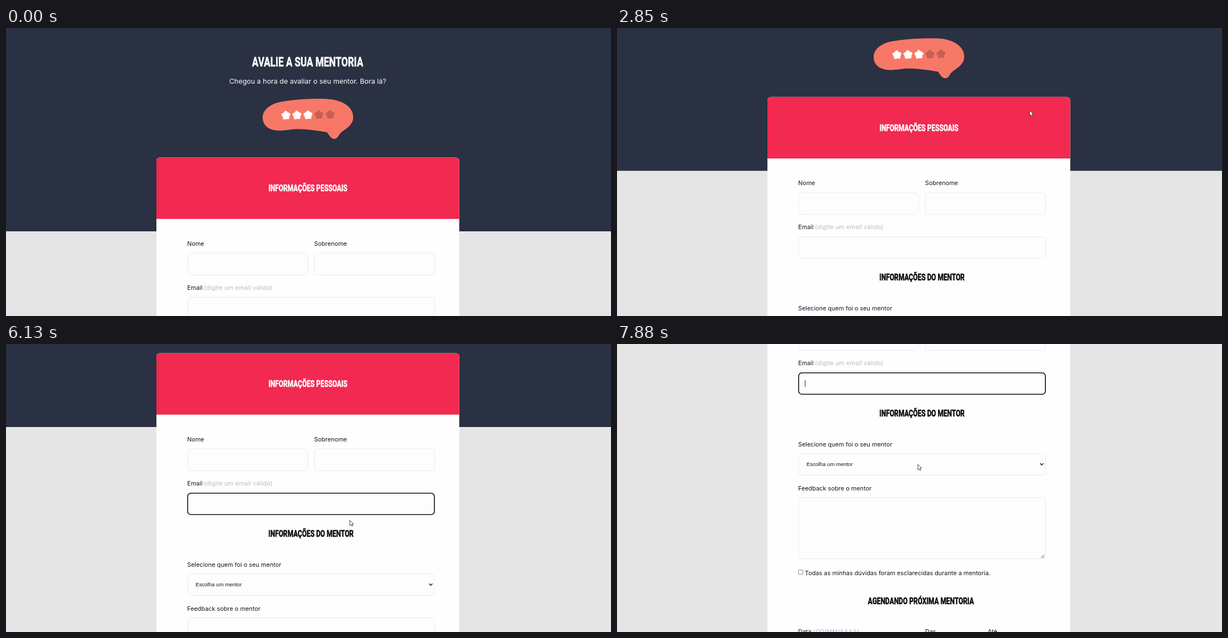
An HTML page for the animation above (8 s loop, 1082 by 517 pixels).

```html
<!DOCTYPE html>
<html lang="pt-BR">
<head>
<meta charset="utf-8">
<title>Avalie a sua mentoria</title>
<style>
  html, body { margin: 0; width: 100%; height: 100%; overflow: hidden; background: #e5e5e5; }
  svg { display: block; }
  text { font: 10.75px Inter, sans-serif; letter-spacing: .04px; fill: #17131f; }
  .head { font: bold 17.2px Roboto, sans-serif; letter-spacing: 0; fill: #0c0c10; stroke: #0c0c10; stroke-width: .6; text-anchor: middle; }
  .light { fill: #fff; stroke: #fff; }
  .title { font-size: 24.6px; }
  .lead { font-size: 12.35px; fill: #fff; text-anchor: middle; }
  .hint { fill: #bab7ca; letter-spacing: .22px; }
  .choice { font: 9.6px "Liberation Sans", Arial, sans-serif; letter-spacing: 0; }
  .field { fill: #fdfdfd; stroke: #ebebee; }
  #ring { fill: none; stroke: #121216; stroke-width: 1.6; }
  .thin { fill: none; stroke: #222; }
</style>
</head>
<body>
<svg width="1082" height="517" viewBox="0 0 1082 517">
  <g id="page">
    <rect width="1082" height="365" fill="#293142"/>
    <text class="lead" x="539.7" y="100.3">Chegou a hora de avaliar o seu mentor. Bora lá?</text>
    <path fill="#f87868" d="M459 161C459 147 472 137 490 133C515 128 550 126 575 127.5C602 129 621 142 621 160C621 174 609 180 600 187C594 192 594 199 587 199C581 199 578 192 574 187C560 185 545 182 525 181.5C508 181 498 185 485 184C469 183 459 174 459 161Z"/>
    <g id="stars" stroke-width="5" stroke-linejoin="round"></g>

    <rect x="269" y="232.4" width="541.6" height="900" rx="6" fill="#fefefe"/>
    <path fill="#f22950" d="M269 342.8V238.4a6 6 0 0 1 6-6H804.6a6 6 0 0 1 6 6V342.8Z"/>
    <g id="heads"></g>

    <text x="324" y="391">Nome</text>
    <text x="551" y="391">Sobrenome</text>
    <text x="324" y="470">Email</text>
    <text class="hint" x="354" y="470">(digite um email válido)</text>
    <text x="324" y="615.5">Selecione quem foi o seu mentor</text>
    <text x="324" y="694.5">Feedback sobre o mentor</text>
    <text x="336" y="847">Todas as minhas dúvidas foram esclarecidas durante a mentoria.</text>
    <text x="324" y="952">Data</text>
    <text class="hint" x="351" y="952">(DD/MM/AAAA)</text>
    <text x="551" y="952">Das</text>
    <text x="663" y="952">Até</text>

    <g class="field">
      <rect x="324.5" y="404" width="215" height="39.5" rx="6"/>
      <rect x="551.5" y="404" width="215" height="39.5" rx="6"/>
      <rect x="324.5" y="483.5" width="442" height="39" rx="6"/>
      <rect x="324.5" y="628.5" width="442" height="39" rx="6"/>
      <rect x="324.5" y="707.5" width="442" height="110" rx="6"/>
    </g>
    <text class="choice" x="339" y="651">Escolha um mentor</text>
    <path class="thin" stroke-width="1.6" d="M756.8 646.3l2.9 2.9 2.9-2.9"/>
    <path class="thin" stroke-width=".9" d="M758.5 816l5.5-5.5M762 816l2-2"/>
    <rect x="324.7" y="837.7" width="8" height="8" rx="1.5" fill="#fff" stroke="#777" stroke-width=".9"/>

    <rect id="ring" rx="6"/>
    <rect id="caret" width="1" height="11.5" fill="#222"/>
  </g>
  <path id="cursor" d="M0 0V9.6L2.2 7.6L3.7 11L5.4 10.2L4 6.9H6.9Z" fill="#fff" stroke="#222" stroke-width=".8"/>
</svg>
<script>
const LOOP = 8000, NOTCH = 72, NOTCH_TIME = 170, BLINK = 530;
const $ = id => document.getElementById(id);
const smooth = p => { p = Math.min(1, Math.max(0, p)); return p * p * (3 - 2 * p); };

// The display face is a bold sans set in one condensed proportion.
const heading = (text, x, y, style = "") =>
  `<text class="head ${style}" transform="translate(${x} ${y}) scale(.69 1)">${text}</text>`;
$("heads").innerHTML =
  heading("AVALIE A SUA MENTORIA", 539.5, 69, "light title") +
  heading("INFORMAÇÕES PESSOAIS", 540, 293.4, "light") +
  heading("INFORMAÇÕES DO MENTOR", 545.5, 561.5) +
  heading("AGENDANDO PRÓXIMA MENTORIA", 543.5, 898.8);

const star = Array.from({ length: 10 }, (_, i) => {
  const r = i % 2 ? 3.8 : 5.7, a = i * Math.PI / 5;
  return `${r * Math.sin(a)},${-r * Math.cos(a)}`;
}).join(" ");
$("stars").innerHTML = [0, 1, 2, 3, 4].map(i => {
  const color = i < 3 ? "#fff" : "#c75f56";
  return `<polygon points="${star}" fill="${color}" stroke="${color}" transform="translate(${500.7 + i * 19.7} ${157 - i * .35}) rotate(-4)"/>`;
}).join("");

const notches = [1989, 2765, 2973, 6353, 6545, 7160];

// Pointer stops: time, x, y
const stops = [
  [380, 1037, 517], [1180, 738, 148], [3190, 738, 148], [3640, 440, 178],
  [3760, 430, 208], [3950, 430, 208], [4330, 640, 206], [4510, 610, 240],
  [4790, 574, 254], [5030, 545, 423], [5350, 472, 285], [5420, 465, 284],
  [5600, 465, 284], [6340, 651, 324], [7330, 651, 324], [7880, 538, 216]
];

// Focused fields: start time, then box
const focuses = [
  [3760, 324.8, 404.3, 214.4, 39],
  [4350, 551.8, 404.3, 214.4, 39],
  [5340, 324.8, 483.7, 441.4, 38.6]
];

function pointerAt(t) {
  if (t >= 70 && t < 120) return [1030, 510];
  if (t < stops[0][0]) return [1100, 530];
  const next = stops.findIndex(s => s[0] > t);
  if (next < 0) return stops[stops.length - 1].slice(1);
  const [t0, x0, y0] = stops[next - 1], [t1, x1, y1] = stops[next];
  const p = smooth((t - t0) / (t1 - t0));
  return [x0 + (x1 - x0) * p, y0 + (y1 - y0) * p];
}

function place(element, attributes) {
  for (const name in attributes) element.setAttribute(name, attributes[name]);
}

function draw() {
  const t = performance.now() % LOOP;
  const scroll = notches.reduce((sum, start) => sum + NOTCH * smooth((t - start) / NOTCH_TIME), 0);
  place($("page"), { transform: `translate(0 ${-scroll})` });
  place($("cursor"), { transform: `translate(${pointerAt(t)})` });

  const focus = focuses.filter(f => f[0] <= t).pop();
  $("ring").style.display = focus ? "" : "none";
  let caretOn = false;
  if (focus) {
    const [start, x, y, width, height] = focus;
    place($("ring"), { x, y, width, height });
    place($("caret"), { x: x + 11.2, y: y + height / 2 - 5.8 });
    caretOn = (t - start) % (2 * BLINK) < BLINK;
  }
  $("caret").style.display = caretOn ? "" : "none";
  requestAnimationFrame(draw);
}
draw();
</script>
</body>
</html>
```
